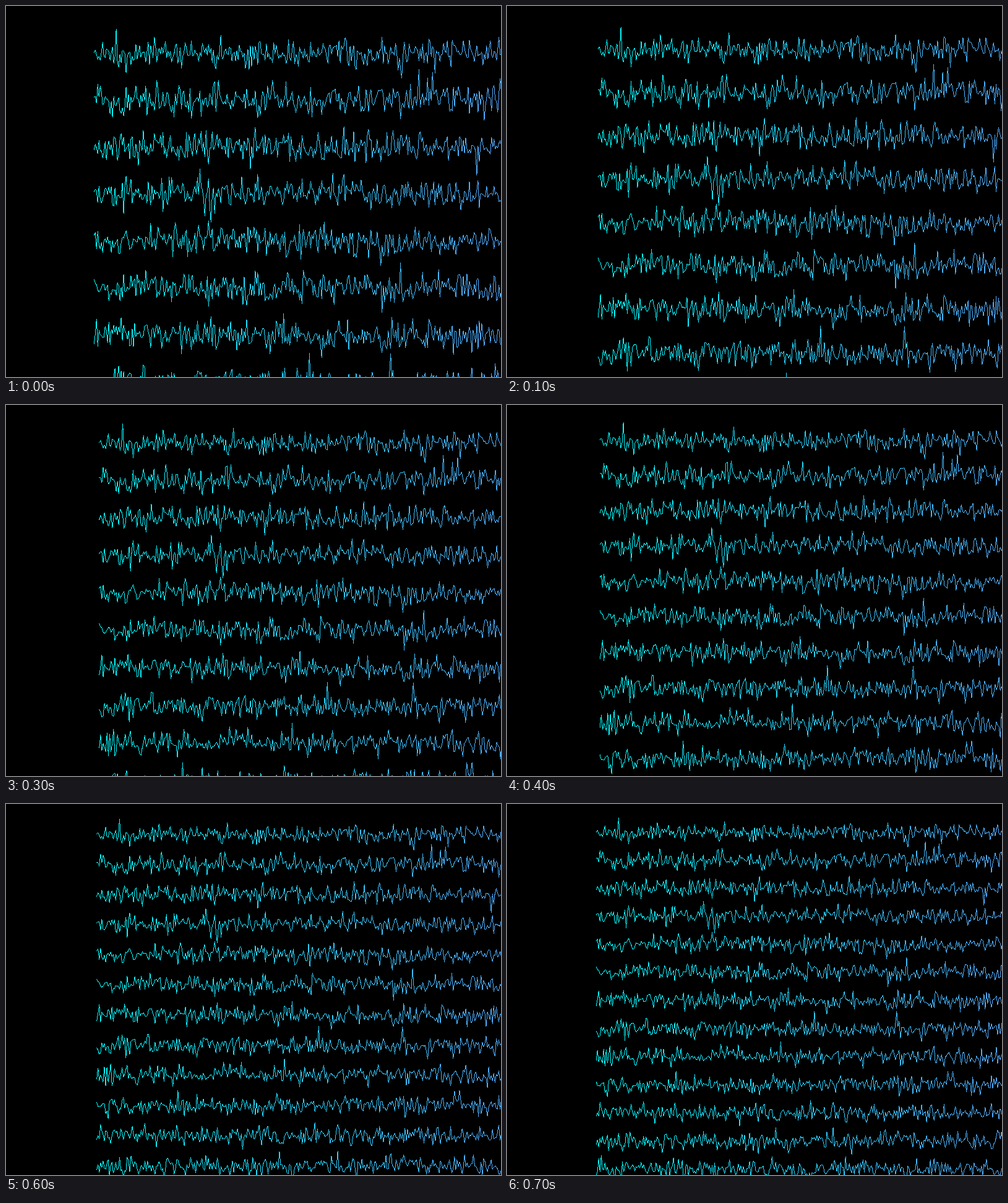
Animation, 800 px wide and 600 px high, one loop 800 ms. Source, as a matplotlib script:

```python
import numpy as np
import matplotlib.pyplot as plt
from matplotlib.animation import FuncAnimation

WIDTH, HEIGHT, DPI = 800, 600, 100
FRAMES, INTERVAL = 8, 100
ROWS, SAMPLES = 14, 1000
LEFT, TOP = 71.3, 0.985  # empty margin, in samples and in rows

# Zoom at a few key steps: pixels per sample and rows in view
KEYS = [0, 2, 4, 7]
SAMPLE_ZOOM = np.polyfit(KEYS, [1.989, 2.093, 2.1004, 2.015], 3)
ROWS_IN_VIEW = [7.88, 9.23, 10.49, 13.21]

# The most prominent spikes: (row, sample, height in rows)
SPIKES = [(0, 18, 0.50), (1, 264, 0.65), (1, 275, 0.58),
          (3, 95, -0.60), (7, 175, 0.62), (7, 241, 0.60)]


def make_signals():
    signals = np.random.default_rng(7).normal(0, 0.165, (ROWS, SAMPLES))
    for row, sample, height in SPIKES:
        signals[row, sample] = height
    return signals


def draw_line(canvas, x, y, colors):
    """Plot a polyline one pixel wide, without smoothing."""
    dx, dy = np.diff(x), np.diff(y)
    steps = np.ceil(np.maximum(abs(dx), abs(dy)))[:, None]
    t = np.minimum(np.arange(steps.max() + 1) / steps, 1)
    px = np.rint(x[:-1, None] + t * dx[:, None]).astype(int)
    py = np.rint(y[:-1, None] + t * dy[:, None]).astype(int)
    seen = (px >= 0) & (px < WIDTH) & (py >= 0) & (py < HEIGHT)
    segment = np.nonzero(seen)[0]
    canvas[py[seen], px[seen]] = colors[segment]


signals = make_signals()
samples = np.arange(SAMPLES)
fade = samples / SAMPLES
colors = np.column_stack([fade, 1 - fade, np.ones(SAMPLES)])


def render(frame):
    canvas = np.zeros((HEIGHT, WIDTH, 3))
    x = (samples + LEFT) * np.polyval(SAMPLE_ZOOM, frame)
    spacing = HEIGHT / np.interp(frame, KEYS, ROWS_IN_VIEW)
    for row, signal in enumerate(signals):
        draw_line(canvas, x, (row + TOP - signal) * spacing, colors)
    return canvas


fig = plt.figure(figsize=(WIDTH / DPI, HEIGHT / DPI), dpi=DPI, facecolor="black")
ax = fig.add_axes([0, 0, 1, 1])
ax.axis("off")
picture = ax.imshow(render(0), aspect="auto", interpolation="nearest")


def update(frame):
    picture.set_data(render(frame))
    return [picture]


anim = FuncAnimation(fig, update, frames=FRAMES, interval=INTERVAL,
                     init_func=lambda: update(0), repeat=True, repeat_delay=0)
plt.show()
```
